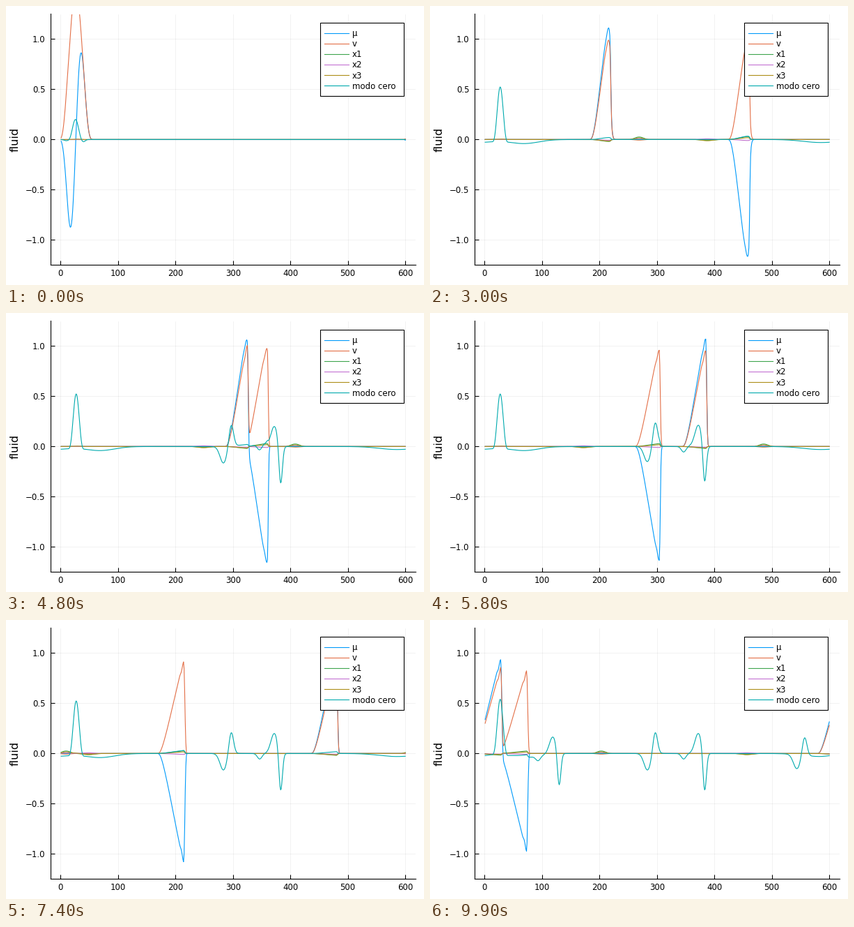
A matplotlib script that plays this animation: 600 by 400 pixels, repeating every 10 s.

```python
import numpy as np
import matplotlib.pyplot as plt
from matplotlib.animation import FuncAnimation
from matplotlib.patches import Rectangle

N, FRAMES = 600, 100
WIDTH = 23.5      # half width of the starting pulse
STEEPEN = 0.32    # extra speed per unit of height

CURVES = {"μ": "#009afa", "v": "#e36f47", "x1": "#3ea44e",
          "x2": "#c371d2", "x3": "#ac8e18", "modo cero": "#00aaae"}

x = np.arange(1, N + 1)


def bump(u):
    return np.clip(1 - u**2, 0, None) ** 4


def near(center):
    """Signed periodic distance from center."""
    return (x - center + N / 2) % N - N / 2


def gauss(height, center, spread):
    return height * np.exp(-0.5 * (near(center) / spread)**2)


def ease(t, a, b):
    s = np.clip((t - a) / (b - a), 0, 1)
    return s * s * (3 - 2 * s)


def pulse(t, start, speed, amp, peak):
    """Steepening wave: sheared rear flank and a narrowing front."""
    u = np.linspace(-WIDTH, 0, 90)
    h = amp * bump(u / WIDTH)
    lag = max(peak - start - t * (speed + STEEPEN * amp), 0)
    rear = start + u + t * (speed + STEEPEN * h) + (h / amp)**2 * lag
    keep = rear <= peak
    r = -u[::-1]
    n = bump(r / WIDTH)
    front = np.maximum(r - STEEPEN * t * amp * (1 - n), 0.22 * r)
    front = peak + np.maximum.accumulate(front)
    px = np.concatenate([rear[keep], front])
    py = np.concatenate([h[keep], np.interp(peak, rear, h) * n])
    d = near(peak)
    y = np.interp(d + peak, px, py, left=0, right=0)
    y = 0.5 * y + 0.25 * (np.roll(y, 1) + np.roll(y, -1))
    return y - 0.03 * min(t / 80, 1) * np.exp(-((d + 4) / 2)**2)


def wake(left, right, size):
    """Standing trace left where the waves cross."""
    trace = gauss(-.165, left - 13.5, 6) + gauss(.22, left, 4)
    trace += gauss(.2, right - 11, 6) + gauss(-.4, right, 3)
    return size * (trace + gauss(-.055, right - 36.5, 4))


def zero_mode(t, right_peak, left_peak):
    grow = ease(t, 0, 6)
    d = near(0)
    behind_right = ease(right_peak - 10 - d, -12, 12)
    behind_left = ease(d - left_peak - 10, -12, 12)
    y = (0.2 + 0.345 * grow) * bump(near(26 + 1.2 * grow) / 14.5)
    y += (1 - grow) * (gauss(-.012, 10, 3.5) + gauss(-.022, 40, 3))
    y += grow * behind_right * gauss(-.04, 69, 25)
    y += grow * behind_left * gauss(-.03, 585, 30)
    y += ease(t, 41, 46) * wake(297, 383, 1)
    return y + ease(t, 84, 89) * wake(557, 129.7, 0.85)


def state(t):
    grow = ease(t, 0, 8)
    right_peak = 33 + 6.13 * t - .0012 * t**2
    left_peak = 20 - 5.355 * t - .0017 * t**2
    amp_a, amp_b = 1.02 + 0.1 * grow, 1.03 + 0.14 * grow
    a = pulse(t, 33, 5.75, amp_a, right_peak)
    b = pulse(t, 20, -5.79, amp_b, left_peak)
    na, nb = grow * a / amp_a, grow * b / amp_b
    fast_r = grow * bump(near(36.8 + 7.74 * t) / 21)
    fast_l = grow * bump(near(18.6 - 7.7 * t) / 28)
    return [
        a - b,
        (1 - .11 * grow) * a + (1 - .154 * grow) * b - .006 * fast_r,
        -.02 * na + .03 * nb + .025 * fast_r - .009 * fast_l,
        -.008 * na - .01 * nb + .009 * fast_r + .007 * fast_l,
        -.016 * na + .018 * nb + .016 * fast_r - .012 * fast_l + gauss(.004, 27, 6),
        .02 * na + .033 * nb + zero_mode(t, right_peak, left_peak),
    ]


plt.rcParams.update({"font.family": "DejaVu Sans", "font.size": 8.5})
fig = plt.figure(figsize=(6, 4), dpi=100, facecolor="white")
ax = fig.add_axes([64.3 / 600, 1 - 371.3 / 400, 523.7 / 600, 359.8 / 400])
ax.set(xlim=(-17, 618), ylim=(-1.25, 1.25),
       xticks=range(0, 601, 100), yticks=np.arange(-1, 1.1, 0.5))
ax.set_axisbelow(True)
ax.grid(color="black", alpha=0.07, lw=0.5)
ax.spines[["top", "right"]].set_visible(False)
ax.spines[["left", "bottom"]].set_linewidth(0.8)
ax.tick_params(direction="in", length=4.2, width=0.8)
ax.tick_params(axis="x", pad=3.8)
ax.tick_params(axis="y", pad=5.6)
fig.text(20.5 / 600, 1 - 191.5 / 400, "fluid", rotation=90, fontsize=11.5,
         ha="right", va="center")
lines = [ax.plot([], [], color=c, lw=0.8)[0] for c in CURVES.values()]

# legend in pixel coordinates
key = fig.add_axes([0, 0, 1, 1], zorder=5)
key.set(xlim=(0, 600), ylim=(400, 0))
key.axis("off")
key.add_patch(Rectangle((451, 23.6), 119.5, 105.7, fc="white", ec="black", lw=0.8))
for i, (label, color) in enumerate(CURVES.items()):
    row = 38.9 + 15.1 * i
    key.plot([457, 491.5], [row, row], color=color, lw=0.8)
    key.text(497, row + 4.3, label, va="baseline")


def update(frame):
    for line, y in zip(lines, state(frame)):
        line.set_data(x, y)
    return lines


anim = FuncAnimation(fig, update, frames=FRAMES, interval=100,
                     init_func=lambda: update(0), repeat=True, repeat_delay=0)
plt.show()
```
